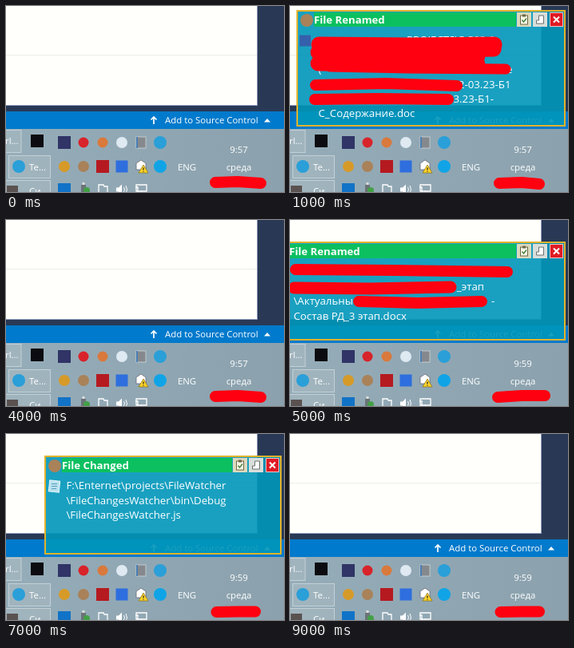
An HTML page for the animation above (10000 ms loop, 348 by 233 pixels).

```html
<!DOCTYPE html>
<html lang="en">
<head>
<meta charset="utf-8">
<title>File change notifications</title>
<style>
  html, body { margin: 0; width: 100%; height: 100%; overflow: hidden; }
  svg { display: block; width: 100vw; height: 100vh; }
  text { font-family: "Open Sans", "Noto Sans", sans-serif; font-size: 11.4px; fill: #fff; white-space: pre; }
  .title { font-size: 13.2px; font-weight: 700; }
  .body { font-size: 13.25px; }
  .end { text-anchor: end; }
  .mid { text-anchor: middle; }
  .marker { fill: none; stroke: #ff0010; stroke-linecap: round; stroke-linejoin: round; }
  .line { fill: none; stroke: #fff; }
</style>
</head>
<body>
<svg id="stage" viewBox="0 0 348 233"></svg>
<script>
const rect = (x, y, w, h, fill, more = '') =>
  `<rect x="${x}" y="${y}" width="${w}" height="${h}" fill="${fill}" ${more}/>`;
const dot = (x, y, r, fill) => `<circle cx="${x}" cy="${y}" r="${r}" fill="${fill}"/>`;
const path = (d, attrs) => `<path d="${d}" ${attrs}/>`;
const label = (x, y, str, cls = '') => `<text x="${x}" y="${y}" class="${cls}">${str}</text>`;
const marker = (d, width) => path(d, `class="marker" stroke-width="${width}"`);
const tile = (x, y, fill, size = 16) => rect(x - size / 2, y - size / 2, size, size, fill);

function desktop() {
  return rect(0, 0, 348, 233, '#293955')
    + rect(-1, -1, 315.5, 125.5, '#fffffb', 'stroke="#8e9bbc"')
    + rect(0, 61, 314, 1, '#ececea')
    + rect(0, 132, 348, 22, '#007acc')
    + path('M185 148V139M181.5 142.5L185 139L188.5 142.5', 'class="line" stroke-width="1.7"')
    + label(199, 147, 'Add to Source Control')
    + path('M323 145.5L327 141L331 145.5Z', 'fill="#fff"');
}

function taskbar() {
  const button = (x, y, w) => rect(x, y, w, 28, '#a9bac2', 'fill-opacity=".6" stroke="#c4d0d6"');
  return rect(0, 154, 348, 79, 'url(#bar)')
    + button(-5, 155.5, 24) + label(-1, 173, 'rl...')
    + button(3.5, 187.5, 52) + dot(16, 201, 8, '#2a9fd8') + label(29, 205.5, 'Te...')
    + button(-5, 218.5, 60.5) + tile(8, 232, '#5a5250', 14) + label(29, 236, 'Си...')
    + tile(39, 169, '#0b0b10')
    + tray()
    + label(226.5, 205.5, 'ENG', 'mid')
    + label(291.5, 206, 'среда', 'mid');
}

function tray() {
  const [a, b, c, d, e, f] = [73, 97, 121, 145, 169, 193];
  return tile(a, 171, '#303466') + dot(b, 171, 6.5, '#d8232a') + dot(c, 171, 6.5, '#d9793c')
    + dot(d, 171, 7, '#dfe9f2')
    + rect(e - 6, 164, 12, 14, '#85898d', 'stroke="#d0d6da" stroke-width=".8"') + rect(e - 6, 164, 2, 14, '#4a7fb5')
    + dot(f, 171, 8, '#2a9fd8')
    + dot(a, 201, 7, '#d69a28') + dot(b, 201, 7, '#a98259') + tile(c, 201, '#b51a20')
    + tile(d, 201, '#2e6ede', 15)
    + path('M163 205V197L169 193L175 197V205Z', 'fill="#fff" stroke="#667" stroke-width=".8"')
    + path('M172 199L178 209H166Z', 'fill="#ffd42a" stroke="#856a10" stroke-width=".7"')
    + path('M172 202.5V205.5M172 206.8V207.8', 'stroke="#222" stroke-width="1.2"')
    + dot(f, 201, 8, '#10a4e6')
    + tile(a, 230, '#1173c7')
    + rect(94, 224, 6, 9, '#6b7378') + rect(95.5, 221, 3, 3, '#ddd') + dot(101, 231, 4, '#43a047')
    + path('M116 233V224H122L123 226H127V233', 'class="line" stroke-width="1.3"')
    + path('M138 227.5H141L145 223.5V236.5L141 232.5H138Z', 'fill="#fff"')
    + path('M147.5 227Q149.5 230 147.5 233M150 225Q153 230 150 235', 'class="line"')
    + path('M163 224H176V232H163ZM169.5 232V236M162 227H165V234', 'class="line" stroke-width="1.3"');
}

// Body text starts 26.5 px from the window's left side; its lines are 18.4 px apart.
const LINE = 18.4;

function popup({ x, y, title, icon, lines, marks }) {
  const right = 344, bottom = 150;
  const bodyText = lines.map(([row, str, textX = x + 26.5, cls = '']) =>
    label(textX, y + 41.3 + row * LINE, str, 'body ' + cls)).join('');
  return rect(x, y, right - x, bottom - y, '#0096ba', 'fill-opacity=".9"')
    + rect(x + 21, y + 2, 283 - x - 21, 18, '#0cc060')
    + dot(x + 12, y + 12, 8, '#a98259')
    + label(x + 21, y + 16, title, 'title')
    + controls(y + 2)
    + icon(x + 11, y + 37.5)
    + bodyText
    + marks.map(([d, width]) => marker(d, width)).join('')
    + rect(x, y, right - x, bottom - y, 'none', 'stroke="#e2b32c" stroke-width="2"');
}

function controls(y) {
  return `<g transform="translate(0 ${y})">`
    + rect(284, 0, 18, 18, '#dcd9bd') + rect(288.5, 4, 9, 11, '#f8f7e8', 'stroke="#6d6847"')
    + rect(291, 2.5, 4, 3, '#6d6847') + path('M290.5 9.5L292.5 12L296 7.5', 'fill="none" stroke="#3b7a35" stroke-width="1.3"')
    + rect(304, 0, 18, 18, '#d9dedb') + path('M311.5 4H317.5V14H308.5V10H311.5Z', 'fill="#fff" stroke="#68716d"')
    + rect(325.5, .5, 16, 17, '#e01b24', 'stroke="#f5c4c4"')
    + path('M330 5.5L337 12.5M337 5.5L330 12.5', 'class="line" stroke-width="2"')
    + '</g>';
}

const documentIcon = (x, y) => tile(x - 1, y, '#3560ac', 14);
const notepadIcon = (x, y) => rect(x - 6, y - 7, 13, 14, '#b9e2ef', `stroke="#e9f7fb" transform="rotate(6 ${x} ${y})"`)
  + path(`M${x - 3} ${y - 3}h7m-7 3h7m-7 3h6`, 'fill="none" stroke="#5a9fb8"');

const renamedLines = [
  [0, 'PROJECTS\\5.583-3', 257, 'end'],
  [2, '('],
  [2, 'полнение', 278.5, 'end'],
  [3, '02-03.23-Б1', 276.5, 'end'],
  [4, '03.23-Б1-', 255, 'end'],
  [5, 'С_Содержание.doc'],
];

const popups = [
  { x: 9, y: 6, title: 'File Renamed', icon: documentIcon, lines: renamedLines, marks: [
    ['M36 48L150 49L256 48L255 54L35 58L235 63L35 72L235 73', 19],
    ['M50 76L150 78L270 79', 13],
    ['M32 99L120 97L209 100', 14],
    ['M31 117L110 116L198 117', 14],
  ] },
  { x: 9, y: 6, title: 'File Renamed', icon: documentIcon, lines: renamedLines, marks: [
    ['M36 48L150 49L256 48L255 53L36 62L243 66', 20],
    ['M48 74L130 76L224 75', 20],
    ['M34 99L140 98L247 98', 14],
    ['M31 117L110 116L198 117', 14],
  ] },
  { x: -22, y: 28, title: 'File Renamed', icon: documentIcon, lines: [
    [1, 'РД_3_этап', 243, 'end'],
    [2, '\\Актуальные'],
    [2, '-', 252],
    [3, 'Состав РД_3 этап.docx'],
  ], marks: [
    ['M7 62L130 63L272 65', 14],
    ['M5 85L100 86L201 84', 15],
    ['M86 102L160 104L240 102', 14],
  ] },
  { x: 49, y: 28, title: 'File Changed', icon: notepadIcon, lines: [
    [0, 'F:\\Enternet\\projects\\FileWatcher'],
    [1, '\\FileChangesWatcher\\bin\\Debug'],
    [2, '\\FileChangesWatcher.js'],
  ], marks: [] },
];

// Marker strokes that cover the date.
const dateMarks = {
  wide: ['M262 221L290 220L319 222', 14],
  short: ['M262 222L290 221L312 223', 14],
  left: ['M256 221L285 222L318 221', 14],
  tilted: ['M260 222L290 220L319 220', 14],
  flat: ['M263.5 223L290 222.5L312 222.5', 14],
};

const cues = [
  { at: 0, clock: '9:57', date: 'wide' },
  { at: 1000, clock: '9:57', date: 'short', popup: 0 },
  { at: 3000, clock: '9:57', date: 'left', popup: 1 },
  { at: 4000, clock: '9:57', date: 'wide' },
  { at: 5000, clock: '9:59', date: 'tilted', popup: 2 },
  { at: 6000, clock: '9:59', date: 'flat' },
  { at: 7000, clock: '9:59', date: 'flat', popup: 3 },
  { at: 9000, clock: '9:59', date: 'flat' },
];
const LOOP = 10000;

const scene = ({ clock, date, popup: index }) =>
  label(291.5, 184, clock, 'mid')
  + marker(...dateMarks[date])
  + (index === undefined ? '' : popup(popups[index]));

document.getElementById('stage').innerHTML =
  '<defs><linearGradient id="bar"><stop stop-color="#95adb9"/><stop offset="1" stop-color="#8ba1ad"/></linearGradient></defs>'
  + desktop() + taskbar() + '<g id="scene"></g>';

const sceneGroup = document.getElementById('scene');
const start = performance.now();
let shown;

function draw() {
  const time = Math.max(0, performance.now() - start) % LOOP;
  const cue = cues.findLast(({ at }) => at <= time);
  if (cue !== shown) {
    sceneGroup.innerHTML = scene(cue);
    shown = cue;
  }
  requestAnimationFrame(draw);
}
draw();
</script>
</body>
</html>
```
